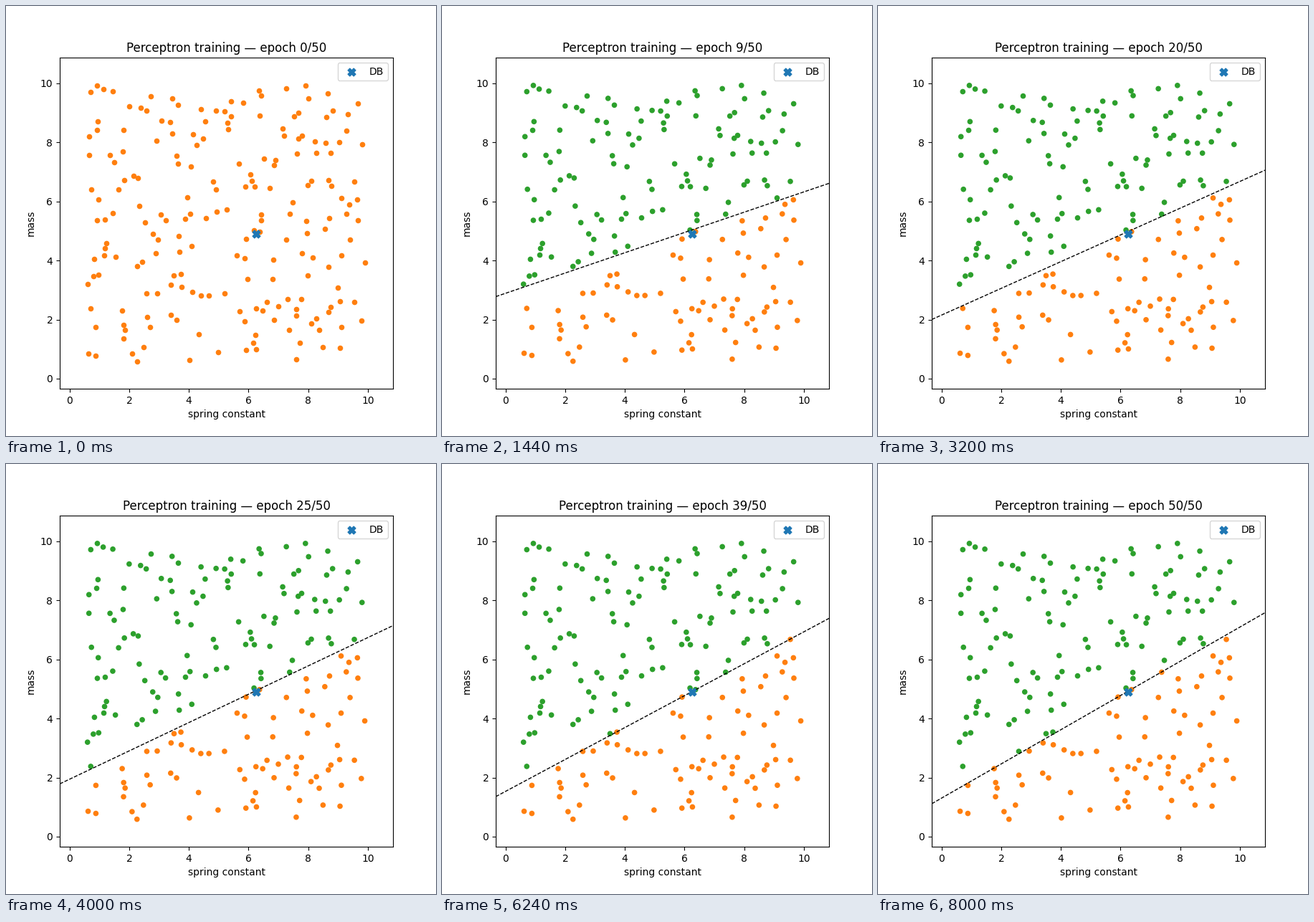
Animation, 600 px wide and 600 px high, one loop 8160 ms. Source, as a matplotlib script:

```python
import numpy as np
import matplotlib.pyplot as plt
from matplotlib.animation import FuncAnimation

EPOCHS = 50
POINT_COUNT = 200
MIN_SPACING = 0.14
X_LIM = (-0.331, 10.847)
Y_LIM = (-0.34, 10.873)

# The outermost samples and a few beside the boundary fix the cloud's extent.
KEY_POINTS = [
    (0.60, 3.20), (0.62, 0.86), (0.71, 9.72), (0.93, 9.93),
    (2.26, 0.59), (7.60, 0.66), (7.91, 9.93), (9.90, 3.92),
    (8.66, 9.67), (9.55, 6.68), (6.37, 4.98), (7.38, 5.57),
]


def boundary_ends(epoch):
    """Heights of the boundary at the left and right edge of the axes."""
    left = 4.91 - 0.97 * np.log(epoch)
    right = 6.71 + 0.0175 * epoch - 2.4 * np.exp(-(epoch / 6) ** 2)
    return left, right


def make_points():
    rng = np.random.default_rng(7)
    points = list(KEY_POINTS)
    while len(points) < POINT_COUNT:
        x, y = rng.uniform(0.6, 9.85, 2)
        if min(np.hypot(x - px, y - py) for px, py in points) > MIN_SPACING:
            points.append((x, y))
    return np.array(points)


points = make_points()
fig, ax = plt.subplots(figsize=(6, 6), dpi=100)
ax.set(xlim=X_LIM, ylim=Y_LIM, xlabel="spring constant", ylabel="mass")
title = ax.set_title("")
dots = ax.scatter(*points.T, s=20, c="tab:orange")
line, = ax.plot([], [], "k--", lw=1)
ax.scatter(6.25, 4.9, s=60, c="tab:blue", marker="X", zorder=5, label="DB")
ax.legend(loc="upper right")


def update(epoch):
    title.set_text(f"Perceptron training — epoch {epoch}/{EPOCHS}")
    if epoch == 0:
        line.set_data([], [])
        dots.set_color("tab:orange")
    else:
        ends = boundary_ends(epoch)
        line.set_data(X_LIM, ends)
        above = points[:, 1] > np.interp(points[:, 0], X_LIM, ends)
        dots.set_color(np.where(above, "tab:green", "tab:orange"))
    return title, line, dots


anim = FuncAnimation(fig, update, frames=EPOCHS + 1, interval=160,
                     repeat=True, repeat_delay=0)
plt.show()
```
